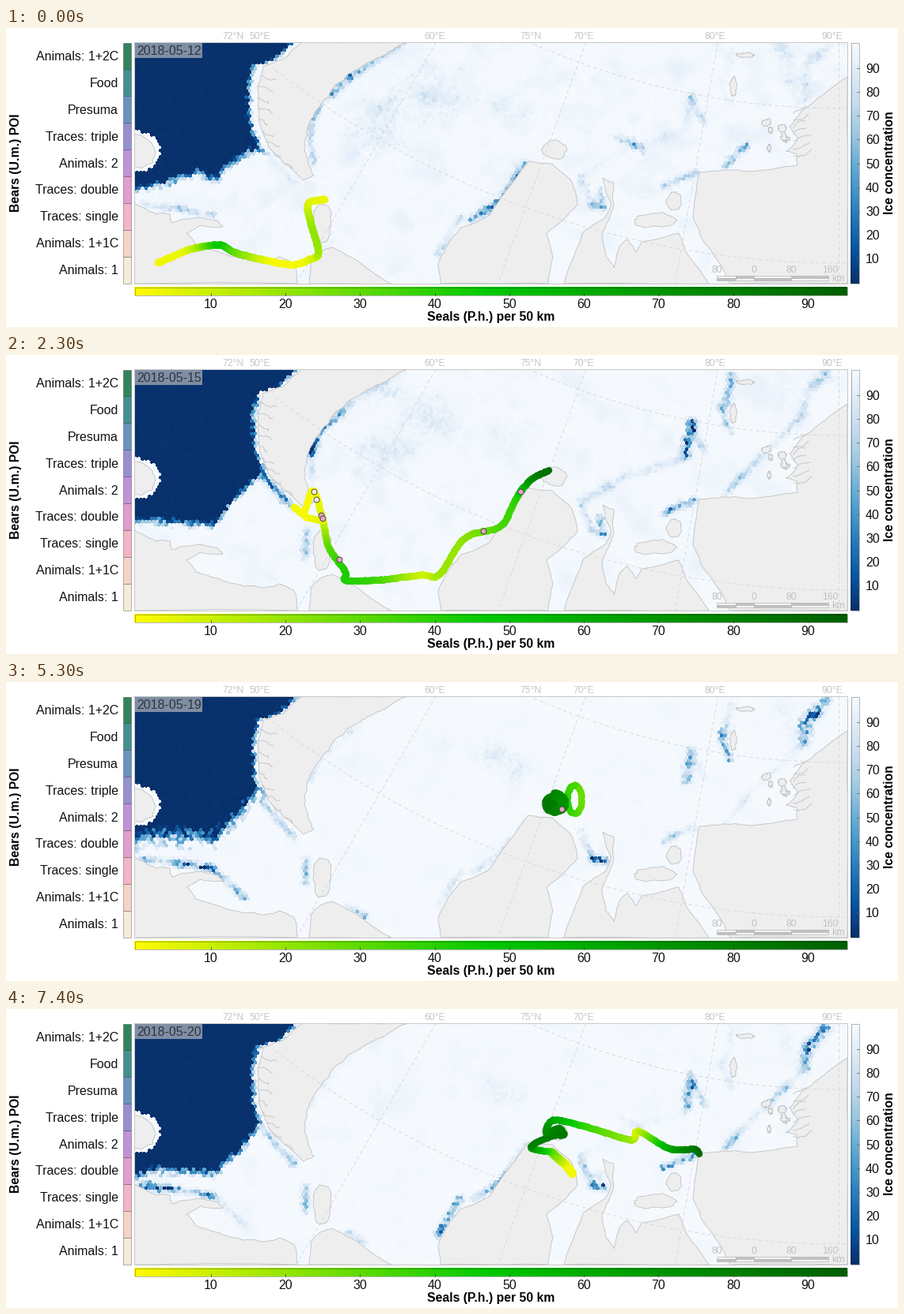
A matplotlib script that plays this animation: 1127x379 px, repeating every 8000 ms.

```python
import numpy as np
import matplotlib.pyplot as plt
from matplotlib.animation import FuncAnimation
from matplotlib.collections import LineCollection
from matplotlib.colors import LinearSegmentedColormap
from matplotlib.patches import Polygon, Rectangle

W, H, DPI = 1127, 379, 128
X0, X1, Y0, Y1 = 162, 1063, 18, 324
PT = 72 / DPI
GRID, COAST, LAND = "#d5d7da", "#bfbfbf", "#eeeeee"
PINK, CREAM = "#e3a3cc", "#f3ecda"
SEALS = LinearSegmentedColormap.from_list("seals", ["#fffb00", "#00c800", "#005f00"])
ICE = plt.get_cmap("Blues_r")


# ---- geometry helpers ----
def pts(*v, dim=2):
    return np.array(v, float).reshape(-1, dim)


def smooth(p, n=12):
    """Catmull-Rom curve through the key points."""
    q = np.vstack([2 * p[0] - p[1], p, 2 * p[-1] - p[-2]])
    t = np.linspace(0, 1, n, endpoint=False)[:, None]
    parts = [b + t * (c - a) / 2 + t**2 * (a - 2.5 * b + 2 * c - d / 2)
             + t**3 * (1.5 * (b - c) + (d - a) / 2)
             for a, b, c, d in zip(q, q[1:], q[2:], q[3:])]
    return np.vstack(parts + [p[-1:]])


def rough(p, rng, amp=1.6):
    """Split each edge three times, shifting the midpoints at random."""
    for _ in range(3):
        mid = (p[:-1] + p[1:]) / 2 + rng.uniform(-amp, amp, (len(p) - 1, 2))
        out = np.empty((2 * len(p) - 1, 2))
        out[::2], out[1::2] = p, mid
        p, amp = out, amp / 2
    return p


def blob(x, y, rx, ry, rng):
    a = np.linspace(0, 2 * np.pi, 11)[:-1]
    r = rng.uniform(0.85, 1.1, len(a))
    return np.column_stack([x + rx * r * np.cos(a), y + ry * r * np.sin(a)])


def orbit(x, y, rx, ry, turns, shrink, seals, swing):
    t = np.linspace(0, 1, 60)
    a, r = 2 * np.pi * turns * t, 1 - shrink * t
    return np.column_stack([x + rx * r * np.sin(a), y - ry * r * np.cos(a),
                            seals - swing * np.sin(a)])


def distance(c, path):
    best = np.full(len(c), 1e9)
    for a, b in zip(path[:-1], path[1:]):
        d = b - a
        t = np.clip((c - a) @ d / (d @ d), 0, 1)
        best = np.minimum(best, np.hypot(*(c - a - t[:, None] * d).T))
    return best


# ---- coastlines, as key points ----
WEST_COAST = pts(374, 18, 350, 40, 325, 48, 318, 75, 320, 120, 332, 151, 352, 172, 376, 193)
EAST_COAST = pts(389, 187, 379, 160, 380, 131, 394, 102, 420, 70, 450, 48, 508, 18)
MAINLAND = [
    pts(162, 324, 162, 222, 190, 236, 207, 236, 210, 247, 240, 240, 268, 245, 274, 252,
        246, 250, 228, 260, 240, 275, 270, 284, 300, 293, 327, 295, 345, 290, 364, 298, 368, 324),
    pts(383, 324, 385, 296, 397, 283, 412, 278, 448, 298, 487, 324),
    pts(549, 324, 546, 300, 556, 278, 575, 253, 610, 238, 640, 196, 660, 169, 690, 172,
        715, 195, 722, 224, 704, 243, 683, 260, 691, 290, 685, 324),
    pts(705, 324, 720, 282, 730, 258, 757, 240, 764, 222, 754, 190, 768, 196, 768, 225,
        753, 262, 758, 290, 768, 304, 775, 278, 785, 268, 796, 284, 804, 271, 850, 260,
        860, 285, 888, 324),
    pts(915, 324, 902, 299, 880, 268, 868, 240, 876, 183, 905, 180, 940, 182, 1000, 174,
        1000, 160, 985, 156, 1000, 140, 990, 125, 1005, 105, 1030, 86, 1063, 62, 1063, 324),
]
# centre and radii
ISLANDS = pts(163, 157, 26, 21, 400, 249, 12, 26, 693, 155, 17, 12, 820, 244, 29, 10,
              844, 219, 9, 12, 919, 75, 4, 13, 934, 34, 12, 3, dim=4)

# ---- open water: southern edge, softness of that edge, gap to the coast ----
SEA = [
    (pts(162, 211, 215, 198, 243, 188, 266, 199, 277, 182, 307, 162), 9, 8),
    (pts(162, 214, 265, 220, 285, 192, 320, 158), 9, 2),
    (pts(162, 216, 190, 206, 265, 210, 300, 172, 320, 145), 20, 2),
    (pts(162, 218, 190, 210, 265, 213, 295, 185, 322, 150), 10, 3),
]
GRAIN = [2.0, 1.7, 0.8, 1.0]

# ---- thin ice: depth on each date, width, path ----
LEADS = [
    ((45, 20, 3, 3), 4, pts(500, 20, 435, 62)),
    ((50, 105, 12, 10), 4, pts(435, 62, 395, 98, 385, 125)),
    ((48, 15, 0, 0), 4, pts(385, 125, 388, 172)),
    ((35, 0, 95, 95), 4, pts(172, 224, 215, 229, 262, 237)),
    ((0, 0, 85, 15), 4, pts(262, 237, 302, 274)),
    ((8, 70, 40, 70), 4, pts(322, 150, 345, 176, 364, 195)),
    ((20, 0, 18, 85), 4, pts(546, 286, 575, 240)),
    ((58, 10, 15, 50), 4, pts(590, 242, 625, 219, 655, 174)),
    ((5, 38, 45, 45), 4, pts(379, 225, 378, 255)),
    ((0, 0, 65, 40), 4, pts(432, 285, 452, 296)),
    ((25, 35, 30, 45), 4, pts(727, 190, 740, 222)),
    ((70, 30, 90, 95), 4, pts(741, 225, 755, 227)),
    ((55, 105, 10, 10), 4, pts(750, 206, 754, 226)),
    ((95, 75, 45, 85), 4, pts(832, 201, 850, 191, 870, 184)),
    ((15, 110, 50, 95), 5, pts(866, 86, 860, 125)),
    ((40, 45, 8, 40), 4, pts(866, 90, 882, 120)),
    ((8, 55, 25, 10), 5, pts(917, 28, 908, 66)),
    ((8, 50, 85, 12), 4, pts(902, 66, 915, 97)),
    ((18, 35, 100, 75), 6, pts(1036, 24, 1012, 48, 1008, 75)),
    ((0, 25, 8, 38), 4, pts(1005, 78, 965, 118, 930, 152, 908, 178)),
    ((70, 6, 4, 20), 4, pts(775, 138, 803, 152)),
    ((6, 22, 0, 6), 5, pts(855, 132, 790, 150, 730, 185)),
    ((50, 8, 5, 15), 4, pts(908, 176, 935, 150)),
    ((12, 9, 2, 2), 24, pts(460, 130, 550, 75)),
    ((8, 16, 2, 2), 15, pts(405, 70, 480, 35)),
    ((8, 4, 11, 8), 15, pts(615, 95, 645, 108)),
    ((20, 6, 5, 5), 10, pts(980, 25, 1005, 90)),
]

# ---- survey strokes: width and key points x, y, seals ----
SURVEY = [
    [(9, smooth(pts(192, 298, 3, 232, 281, 8, 268, 275, 46, 290, 285, 30, 330, 295, 5,
                    362, 300, 2, 385, 293, 6, 395, 284, 18, 386, 250, 20, 382, 223, 8,
                    404, 217, 4, dim=3)))],
    [(8.5, smooth(pts(364, 192, 2, 376, 200, 2, 388, 172, 2, 400, 208, 8, 408, 244, 30,
                      429, 275, 42, 430, 286, 42, 475, 285, 34, 525, 279, 10, 548, 278, 18,
                      580, 232, 22, 625, 217, 34, 646, 179, 42, 665, 157, 75, 687, 146, 90,
                      dim=3))),
     (8, pts(364, 193, 2, 380, 206, 2, 402, 211, 6, dim=3))],
    [(8, orbit(718.5, 149, 9, 18, 1, 0, 34, 6)), (9, orbit(693, 154, 15, 13, 3, 1, 78, 6))],
    [(11, pts(716, 209, 2, 707, 197, 3, 688, 181, 30, dim=3)),
     (8.5, smooth(pts(690, 182, 30, 663, 175, 75, 690, 161, 82, 705, 160, 84, 698, 151, 82,
                      683, 158, 78, 692, 141, 64, 735, 150, 38, 790, 166, 20, 799, 155, 10,
                      838, 177, 60, 870, 178, 84, 876, 184, 88, dim=3)))],
]
SIGHTINGS = [
    [],
    [(389, 173, CREAM), (392, 183, CREAM), (398, 203, PINK), (400, 207, PINK),
     (421, 259, PINK), (603, 223, PINK), (650, 173, PINK)],
    [(702, 161, PINK)],
    [],
]
DATES = ["2018-05-12", "2018-05-15", "2018-05-19", "2018-05-20"]
STARTS = [1, 7, 13]


def hex_cells(pitch=4.6):
    """Centres of the hexagons and, for every map pixel, the index of its cell."""
    y, x = np.mgrid[Y0:Y1, X0:X1] + 0.5
    step = np.array([pitch, pitch * 3 ** 0.5])
    p = np.stack([x, y], -1)
    even = np.round(p / step) * step
    odd = (np.round(p / step - 0.5) + 0.5) * step
    near = ((p - even) ** 2).sum(-1) <= ((p - odd) ** 2).sum(-1)
    c = np.where(near[..., None], even, odd).reshape(-1, 2)
    _, first, inv = np.unique(np.round(c[:, 0] * 10) * 1e5 + np.round(c[:, 1] * 10),
                              return_index=True, return_inverse=True)
    return c[first], inv.reshape(x.shape)


def ice_map(k, centres, cells):
    rng = np.random.default_rng(40 + k)
    n, (x, y) = len(centres), centres.T
    wave = np.zeros(n)
    for _ in range(36):
        a, length = rng.uniform(0, 2 * np.pi), rng.uniform(20, 120)
        wave += np.sin((centres @ [np.cos(a), np.sin(a)]) * 2 * np.pi / length + rng.uniform(0, 7))
    wave /= wave.std()
    conc = 99.5 - GRAIN[k] * (np.maximum(wave, 0) + rng.uniform(0, 1, n))
    for depths, width, path in LEADS:
        d = distance(centres, path) + rng.normal(0, width / 4, n)
        patch = np.clip(0.8 + 0.3 * wave, 0.3, 1.2) * rng.uniform(0.3, 1.2, n)
        conc -= depths[k] * np.exp(-(d / width) ** 2) * patch
    edge, soft, gap = SEA[k]
    south = (np.interp(x, *edge.T) - y) / soft
    east = (np.interp(y, WEST_COAST[:, 1], WEST_COAST[:, 0]) - gap - x) / 6
    melt = 1 - np.clip(np.minimum(south, east) + rng.uniform(-0.4, 0.4, n), 0, 1)
    conc = np.minimum(conc, 100 * melt + rng.uniform(0, 1.5, n))
    conc[((x - 163) / 32) ** 2 + ((y - 157) / 26) ** 2 < 1] = 100
    return ICE(np.clip(conc, 0, 100) / 100)[cells]


fig = plt.figure(figsize=(W / DPI, H / DPI), dpi=DPI, facecolor="white")
ax = fig.add_axes([0, 0, 1, 1])
ax.axis("off")


def text(x, y, s, size=16, **kw):
    kw = {"ha": "center", "va": "baseline", "color": "#111111", "zorder": 9, **kw}
    return ax.text(x, y, s, fontsize=size * PT, fontfamily="Liberation Sans", **kw)


def box(x, y, w, h, **kw):
    return ax.add_patch(Rectangle((x, y), w, h, **kw))


def line(x, y, color, width=1, **kw):
    return ax.plot(x, y, color=color, lw=width * PT, **kw)[0]


# ---- map ----
grid = hex_cells()
ICE_MAPS = [ice_map(k, *grid) for k in range(4)]
ice = ax.imshow(ICE_MAPS[0], extent=(X0, X1, Y1, Y0), interpolation="nearest",
                aspect="auto", zorder=1)
clip = Rectangle((X0, Y0), X1 - X0, Y1 - Y0, transform=ax.transData)

rng = np.random.default_rng(7)
lands = MAINLAND + [np.vstack([WEST_COAST, smooth(EAST_COAST, 3)])]
lands += [blob(*island, rng) for island in ISLANDS]
lands += [blob(*rng.uniform((960, 115), (990, 155)), *rng.uniform(2, 6, 2), rng) for _ in range(6)]
for p in lands:
    shape = Polygon(rough(np.vstack([p, p[:1]]), rng), fc=LAND, ec=COAST, lw=0.8 * PT, zorder=2)
    ax.add_patch(shape)
    shape.set_clip_path(clip)
# fjords cut into the two rugged coasts
for y in range(60, 180, 14):
    x = np.interp(y, WEST_COAST[:, 1], WEST_COAST[:, 0])
    line(*rough(pts(x, y, x + rng.uniform(8, 20), y + 6), rng, 4).T, COAST, 0.8, zorder=2.1)
for y in range(108, 165, 9):
    line(*rough(pts(995, y, 995 + rng.uniform(10, 32), y - 8), rng, 4).T, COAST, 0.8, zorder=2.1)

# graticule around the pole
POLE = np.array([1056, -870])
dash = dict(zorder=3, linestyle=(0, (5, 4)))
for deg in (0, 10, 20, 30):
    y = np.array([Y0, Y1])
    x = POLE[0] - 4 * (deg == 0) - np.tan(np.radians(deg)) * (y - POLE[1])
    line(x, y, GRID, 0.9, **dash).set_clip_path(clip)
for radius in (972, 1168):
    a = np.radians(np.linspace(-1, 38, 150))
    arc = line(POLE[0] - radius * np.sin(a), POLE[1] + radius * np.cos(a), GRID, 0.9, **dash)
    arc.set_clip_path(clip)
for x, s in ((287, "72°N"), (321, "50°E"), (542, "60°E"), (663, "75°N"), (730, "70°E"),
             (896, "80°E"), (1044, "90°E")):
    text(x, 14, s, 12.3, color="#c6c6c6")
box(X0, Y0, X1 - X0, Y1 - Y0, fc="none", ec="#c8c8c8", lw=PT, zorder=8)

# scale bar
for i, (x, w) in enumerate(((898, 23.5), (921.5, 23.5), (945, 47), (992, 47))):
    for row in range(2):
        box(x, 313.5 + 3 * row, w, 3, fc=("#f4f4f4", "#c2c2c2")[(i + row) % 2], ec="#b4b4b4",
            lw=0.7 * PT, zorder=4)
for x, s in ((898, "80"), (945, "0"), (992, "80"), (1041, "160")):
    text(x, 310, s, 12.3, color="#c2c2c2", zorder=4)
text(1051, 321, "km", 12.3, color="#c2c2c2", zorder=4)

# ---- legends ----
KINDS = ["Animals: 1+2C", "Food", "Presuma", "Traces: triple", "Animals: 2",
         "Traces: double", "Traces: single", "Animals: 1+1C", "Animals: 1"]
SHADES = ["#34835f", "#43908f", "#6a92c1", "#9690d3", "#c192d5", "#e09dcd", "#f1b5c6",
          "#f6d3c8", "#f3ecda"]
frame = dict(ec=(0, 0, 0, 0.35), lw=0.8 * PT, zorder=3)
for i, (kind, shade) in enumerate(zip(KINDS, SHADES)):
    box(147.5, Y0 + 0.5 + 33.9 * i, 10, 33.9, fc=shade, **frame)
    text(142, 41 + 33.9 * i, kind, ha="right")

ramp = np.linspace(0, 1, 256)
ax.imshow(ramp[::-1, None], cmap=ICE, extent=(1067, 1078, Y1, Y0), aspect="auto", zorder=2)
box(1067.5, Y0 + 0.5, 10, Y1 - Y0 - 1, fc="none", **frame)
ax.imshow(ramp[None], cmap=SEALS, extent=(X0, X1, 339, 328), aspect="auto", zorder=2)
box(X0 + 0.5, 328.5, X1 - X0 - 1, 10, fc="none", **frame)
for v in range(10, 100, 10):
    y, x = 322 - 3.01 * v, 164.7 + 9.425 * v
    text(1086, y + 6, str(v), ha="left")
    line([1075, 1078], [y, y], "#666666", 0.8, zorder=4)
    text(x, 355, str(v))
    line([x, x], [336, 339], "#444444", 0.8, zorder=4)

bold = dict(weight="bold", color="black")
text(12.5, 171, "Bears (U.m.) POI", 15.7, rotation=90, va="center", **bold)
text(1116.5, 171, "Ice concentration", 15.7, rotation=90, va="center", **bold)
text(613, 371, "Seals (P.h.) per 50 km", 15.7, **bold)

box(163, 19, 85, 19, fc="#c8c8c8", alpha=0.62, lw=0, zorder=7)
date = text(165, 34, DATES[0], ha="left", color="#30343a")


# ---- survey layers ----
def survey(k):
    layers = []
    for width, v in SURVEY[k]:
        reach = np.r_[0, np.cumsum(np.hypot(*np.diff(v[:, :2], axis=0).T))]
        s = np.arange(0, reach[-1], 1.5)
        x, y, seals = (np.interp(s, reach, col) for col in v.T)
        jitter = np.random.default_rng(k).uniform(-0.6, 0.6, (len(s), 2))
        p = np.column_stack([x, y]) + jitter
        layers.append(ax.add_collection(LineCollection(
            np.stack([p[:-1], p[1:]], 1), colors=SEALS(seals[:-1] / 95.5),
            linewidths=width * PT, capstyle="round", zorder=5)))
    for x, y, color in SIGHTINGS[k]:
        layers += ax.plot(x, y, "o", ms=7 * PT, mfc=color, mec="#4a4038", mew=0.9 * PT, zorder=6)
    return layers


SURVEYS = [survey(k) for k in range(4)]
ax.set(xlim=(0, W), ylim=(H, 0))


def update(i):
    k = int(np.searchsorted(STARTS, i, side="right"))
    ice.set_data(ICE_MAPS[k])
    date.set_text(DATES[k])
    for j, layers in enumerate(SURVEYS):
        for layer in layers:
            layer.set_visible(j == k)
    return []


anim = FuncAnimation(fig, update, frames=16, interval=500, repeat=True, repeat_delay=0)
plt.show()
```
